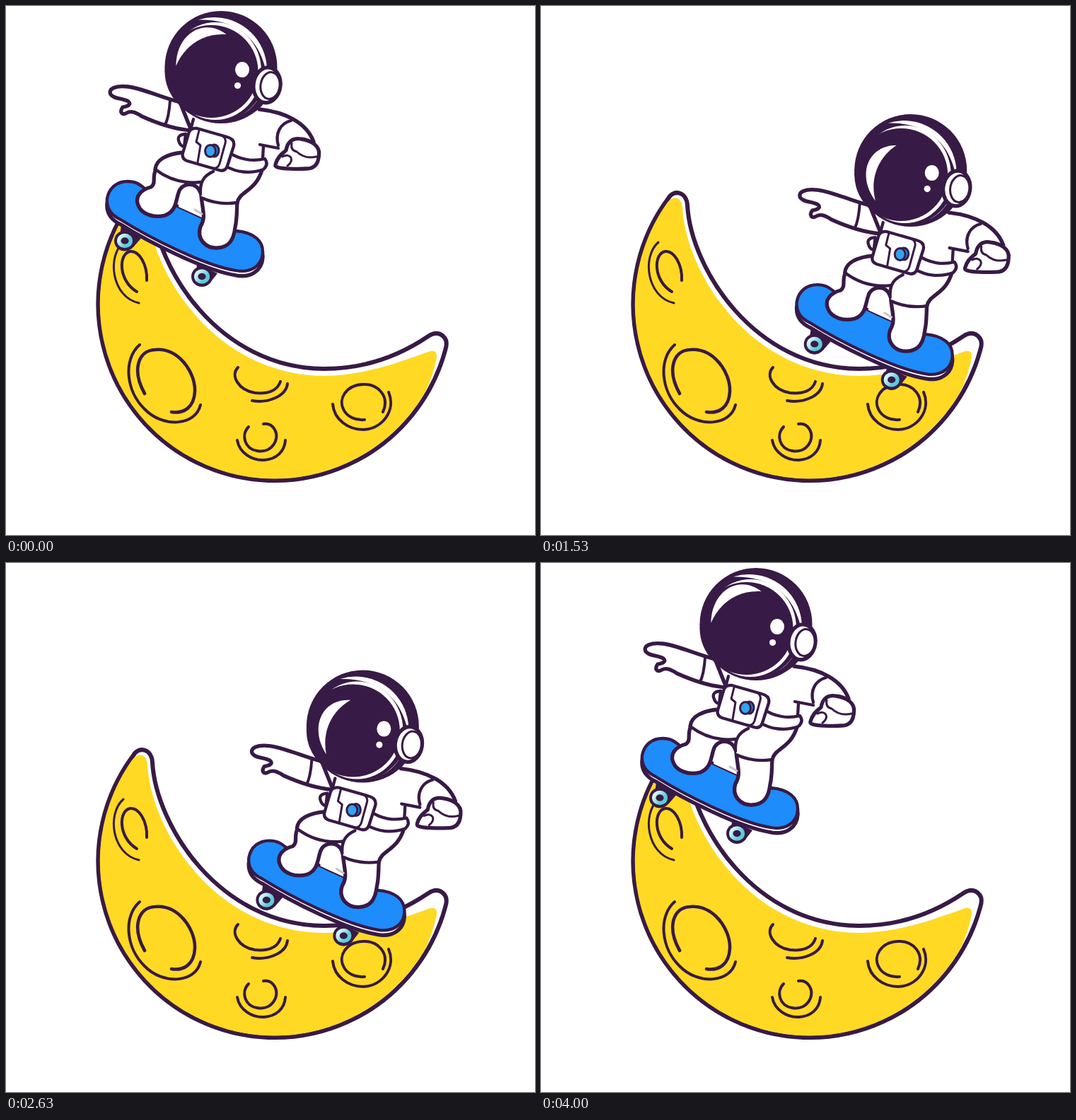
An HTML page that plays this animation: 748 by 748 pixels, repeating every 4060 ms.

```html
<!DOCTYPE html>
<html lang="en">
<head>
<meta charset="utf-8">
<title>Moon skater</title>
<style>
  html, body { margin: 0; width: 100%; height: 100%; overflow: hidden; background: #fff; }
  svg { display: block; width: 100vw; height: 100vh; }
  .line { fill: none; }
  .ink { fill: #381a46; stroke: none; }
  .plain { stroke: none; }
  .thin { stroke-width: 3; }
</style>
</head>
<body>
<svg viewBox="0 0 748 748" fill="#fff" stroke="#381a46" stroke-width="5.3" stroke-linecap="round" stroke-linejoin="round">
  <defs>
    <linearGradient id="tyre" x1="0" y1="0" x2="1" y2=".7">
      <stop offset=".25" stop-color="#d3f6f7"/>
      <stop offset=".75" stop-color="#5dcbd8"/>
    </linearGradient>
    <g id="wheel">
      <ellipse class="ink" rx="15" ry="14.6"/>
      <ellipse class="plain" rx="11" ry="10.2" fill="url(#tyre)"/>
      <ellipse class="ink" rx="5.6" ry="4.7"/>
    </g>
    <path id="deck" d="M172 248C190 248 192 258 212 268C250 287 290 306 325 318C350 320 364 332 363 349C362 368 345 378 325 374C280 367 200 326 162 302C145 294 142 282 143 272C146 256 158 248 172 248Z"/>
  </defs>

  <g id="moon">
    <path stroke-width="6" d="M180 272A249.7 249.7 0 1 0 621 487Q625 475 620 469Q611 458 597 467C560 492 510 513 450 513C300 512 212 370 207 282C206 262 187 259 180 272Z"/>
    <path class="plain" fill="#ffd923" d="M178 279C186 268 198 269 200 284C203 370 290 522 450 523C510 522 560 502 600 488Q610 486 609 497Q603 527 590 551A247 247 0 0 1 380 668.500A247 247 0 0 1 178 279Z"/>
    <g class="line" stroke-width="4">
      <path class="thin" d="M166 334C142 355 150 412 188 420"/>
      <path d="M199 388C200 365 188 346 176 347C159 349 158 388 185 404"/>
      <path stroke-width="4.600" d="M196 548C178 516 186 487 211 486C243 483 268 517 267 545C266 567 252 577 234 574"/>
      <path d="M189 479C165 500 170 545 196 570C222 597 268 594 275 564"/>
      <path d="M328 511C317 522 328 543 352 547C370 549 384 544 388 531"/>
      <path d="M398 534C396 552 370 562 348 558"/>
      <path d="M343 595C332 606 337 626 355 629C375 633 388 613 380 599C376 592 370 590 364 591"/>
      <path d="M327 614C330 632 348 643 365 642C382 641 394 630 395 614"/>
      <path d="M533 574C543 552 526 534 505 535C480 536 470 556 477 570C482 581 494 586 507 585"/>
      <path d="M462 563C464 585 484 599 505 599C532 598 552 572 541 546"/>
    </g>
  </g>

  <g id="skater">
    <g id="board">
      <path class="ink" d="M163 310L193 326L180 341L160 332ZM270 365L299 378L288 392L268 386Z"/>
      <use href="#wheel" x="168" y="332"/>
      <use href="#wheel" x="277" y="382.500"/>
      <use href="#deck" y="6.800"/>
      <use href="#deck" fill="#1e8cfb" stroke-width="4.300"/>
    </g>

    <g id="legs">
      <path class="plain" d="M244 284L248 255L274 252L279 300Z"/>
      <path d="M212 231C206 242 213 250 205 256C190 260 182 270 187 282C192 295 210 300 225 296C241 290 240 275 244 264C248 249 270 248 275 264L277 248Z"/>
      <path d="M276 268C278 290 283 299 275 312C269 330 283 343 299 342C316 341 322 330 324 313C327 300 326 290 327 277Z"/>
      <path class="line thin" stroke="#c9c3cc" stroke-width="1" d="M267 288L277 294"/>
      <path class="plain" d="M251 207C228 209 212 217 211 231Q240 253 275 249L276 271Q300 282 327 278C330 262 353 262 362 232L362 200L260 180Z"/>
      <path class="line" d="M251 207C228 209 212 217 211 231M327 278C330 262 353 262 362 232"/>
      <path class="line" stroke-width="4.300" d="M211 231Q240 253 275 249M276 271Q300 282 327 278M275 266C274 248 280 240 293 234"/>
    </g>

    <g id="arms">
      <path d="M246 136C215 128 195 117 172 114C155 112 144 117 148 125C153 132 165 130 173 135C178 139 172 142 165 143C160 150 164 155 171 151C178 147 186 152 192 156C212 165 235 174 262 176Z"/>
      <path class="line" stroke-width="4" d="M232 134C231 148 229 160 225 168"/>
      <path class="plain" d="M262 140L358 146C395 150 425 165 434 194L385 200L364 198L363 224L254 204L262 172Z"/>
      <path class="line" d="M358 146C395 150 425 165 435 192"/>
      <path class="line" stroke-width="4.300" d="M265 160L261 175M359 196L385 201M364 198L363 216M403 162C388 166 380 180 385 197"/>
      <path d="M381 224C384 212 392 208 396 204C398 192 405 186 417 188C432 190 444 198 442.500 210C442 222 437 230 425 230C410 231 390 230 384 228Q380 227 381 224Z"/>
      <path class="line thin" d="M391 213C402 207 409 218 398 226M404 194Q402 204 411 206Q423 217 439 213"/>
    </g>

    <g id="pack" stroke-width="4.300">
      <path d="M314 206C330 218 350 220 366 216Q372 224 364 231C345 238 325 235 310 226Z"/>
      <path d="M254 181Q242 182 244 190Q246 198 252 199Z"/>
      <path d="M270 173L312 185Q324 188 322 198L313 226Q310 235 301 232L256 219Q248 216 250 208L258 181Q260 172 270 173Z"/>
      <path class="line thin" d="M305 183Q312 187 310 194L302 223Q299 231 292 229M273 176L269 192L275 197L271 221"/>
      <ellipse class="thin" cx="294.500" cy="204.500" rx="6.500" ry="8.500" fill="#1e8cfb"/>
      <ellipse class="thin" cx="289" cy="205" rx="7.500" ry="8.500" fill="#35a3ee"/>
    </g>

    <g id="helmet">
      <circle class="ink" cx="304" cy="86.500" r="79.500"/>
      <path class="plain" d="M272 19.500A74.500 74.500 0 0 1 330 156C362 140 372 104 365 82C353 40 318 18 272 19.500Z"/>
      <ellipse class="plain" cx="296" cy="92" rx="65" ry="69"/>
      <ellipse class="ink" cx="290.500" cy="92.500" rx="66" ry="65.500"/>
      <path id="glare" class="plain" d="M0 -42C-38 -28 -38 18 0 42C-17 18 -20 -14 0 -42Z"/>
      <ellipse class="plain" cx="334" cy="90" rx="10" ry="11"/>
      <circle class="plain" cx="327.500" cy="112.500" r="4.600"/>
      <g transform="rotate(8 370 112)">
        <ellipse cx="369" cy="112" rx="19" ry="25"/>
        <ellipse class="thin" cx="373.500" cy="112" rx="13.500" ry="19"/>
      </g>
    </g>
  </g>
</svg>
<script>
const LOOP = 4060, LAST_STEP = 120, STEP = 100 / 3;
const skater = document.getElementById("skater");
const glare = document.getElementById("glare");

// Smooth curve through [position, value] points; flatEnds makes it rest at both ends.
function curve(points, flatEnds) {
  const slope = i => (points[i + 1][1] - points[i][1]) / (points[i + 1][0] - points[i][0]);
  const last = points.length - 1;
  const tangents = points.map((p, i) => {
    if (i === 0) return flatEnds ? 0 : slope(0) * 1.2;
    if (i === last) return flatEnds ? 0 : slope(last - 1);
    const before = p[0] - points[i - 1][0], after = points[i + 1][0] - p[0];
    return (slope(i - 1) * after + slope(i) * before) / (before + after);
  });
  return x => {
    let i = 0;
    while (i < last - 1 && x > points[i + 1][0]) i++;
    const [x0, y0] = points[i], [x1, y1] = points[i + 1];
    const h = x1 - x0, u = Math.min(1, Math.max(0, (x - x0) / h)), v = 1 - u;
    return v * v * ((1 + 2 * u) * y0 + u * h * tangents[i]) +
           u * u * ((1 + 2 * v) * y1 - v * h * tangents[i + 1]);
  };
}

const rideOut = curve([[0, 0], [530, 13], [970, 78.5], [1070, 105.5], [1530, 218], [1600, 232], [1930, 283], [2110, 293]], true);
const rideBack = curve([[2110, 293], [2630, 201], [3170, 85.5], [3200, 78.5], [3715, 11.5], [4000, 0]], true);
const slopeY = curve([[0, 0], [13, 26], [78, 97], [106, 114], [218, 146], [284, 140], [293, 138]], false);

function draw(ms) {
  const step = Math.min(LAST_STEP, Math.floor(ms / STEP + 0.15));
  const t = step * STEP;
  const x = t < 2110 ? rideOut(t) : rideBack(t);
  skater.setAttribute("transform", `translate(${x} ${slopeY(x)})`);

  const turn = (1 - Math.cos(2 * Math.PI * t / (LAST_STEP * STEP + 30))) / 2;
  glare.setAttribute("transform",
    `translate(${276 - 8 * turn} ${62.5 + 32 * turn}) rotate(${58 - 43 * turn})`);
}

const start = performance.now();
function tick() {
  draw((performance.now() - start) % LOOP);
  requestAnimationFrame(tick);
}
tick();
</script>
</body>
</html>
```
